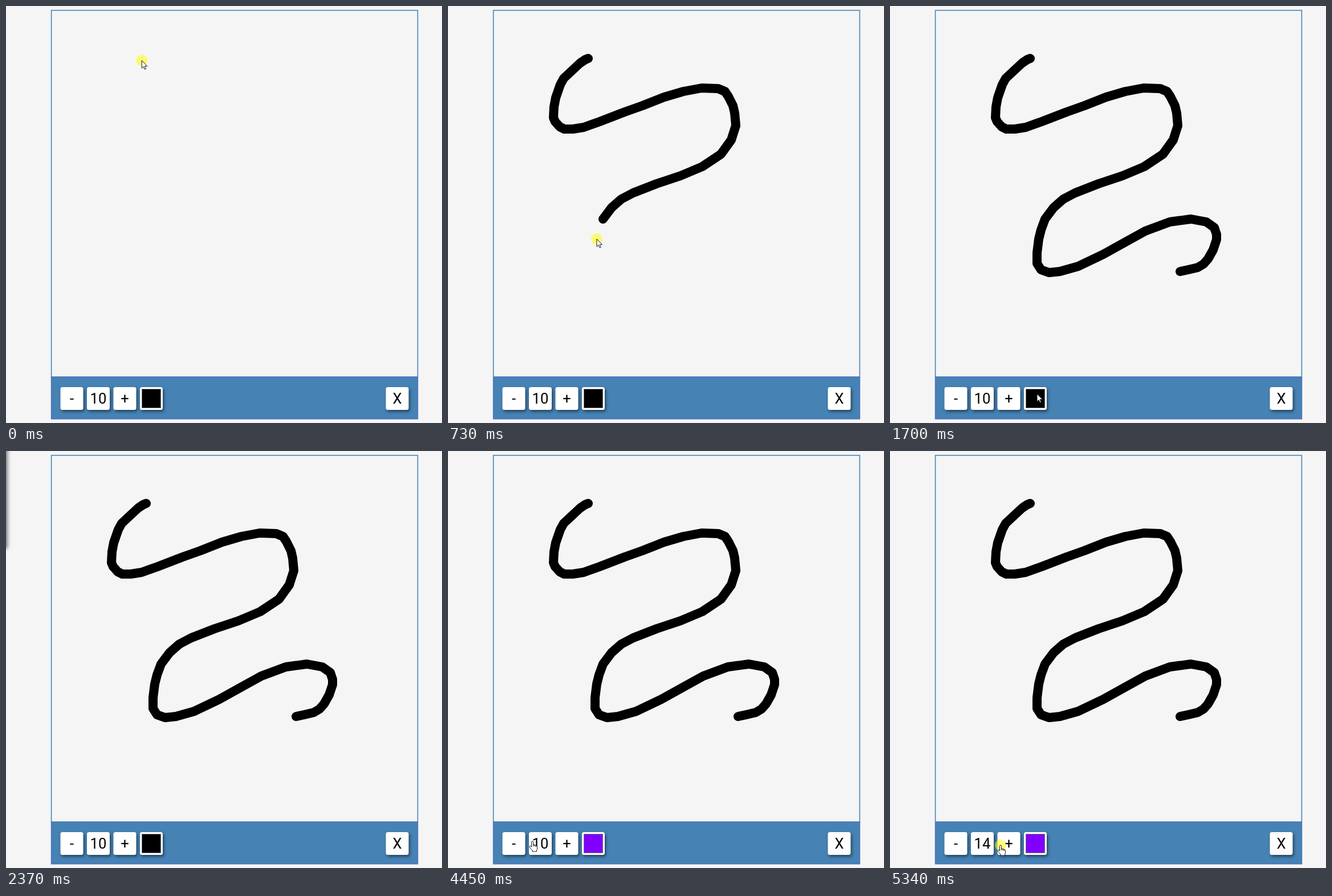
Write an HTML page that moves like this. It is 765x732 px and loops after 5.39 s.

```html
<!DOCTYPE html>
<html lang="en">
<head>
<meta charset="utf-8">
<title>Drawing pad</title>
<style>
  html, body { margin: 0; width: 100%; height: 100%; overflow: hidden; background: #f5f5f5; }
  svg { display: block; width: 100%; height: 100%; }
  text { font: 25.6px Roboto, sans-serif; text-anchor: middle; }
  .button { fill: #fff; filter: drop-shadow(2px 3px 2.5px rgba(0, 0, 0, .5)); }
  .frame { fill: none; stroke: #4682b4; stroke-width: 1.6; }
  .bar { fill: #4682b4; stroke: #4a72c4; stroke-width: 1.6; }
  #stroke { fill: none; stroke: #000; stroke-width: 16; stroke-linecap: round; stroke-linejoin: round; }
  #popup { fill: #fff; filter: drop-shadow(3px 4px 3px rgba(0, 0, 0, .5)); }
  #arrow, #hand { fill: #fff; stroke: #000; stroke-width: .9; stroke-linejoin: round; }
</style>
</head>
<body>
<svg viewBox="0 0 765 732">
  <rect class="frame" x="79.6" y="7.6" width="642.8" height="643.6"/>
  <rect class="bar" x="79.6" y="651.4" width="642.8" height="73.4"/>
  <g id="buttons"></g>
  <rect id="swatch" x="238.5" y="672.5" width="33" height="33" stroke="#777"/>
  <polyline id="stroke"/>
  <rect id="popup" x="-100" y="-50" width="100" height="217"/>
  <g id="cursor">
    <circle id="press" r="10" fill="#ff0" fill-opacity=".53"/>
    <path id="arrow" d="M0 0V13.5L3.1 10.6L5.2 15.5L7.2 14.6L5.2 9.8H9.5Z"/>
    <path id="hand" d="M-1.5 1.5a1.5 1.5 0 0 1 3 0V6l5 1.3q2 .6 2 2.5V13q0 1.5-1 3v2h-7.5v-2l-4.5-5q-1.5-2 .3-2.6 1.2-.3 2.7 1.6zM1.5 6v3M4 6.7v2.8M6.3 7.3v2.6"/>
  </g>
</svg>
<script>
const LOOP = 5390;
const $ = id => document.getElementById(id);

const points = [
  [246,92],[241,94],[232,100],[218,113],[203,127],[197,138],[189,161],[186,177],[185,196],[188,203],
  [196,212],[204,216],[219,216],[238,213],[266,203],[310,186],[341,175],[379,160],[413,150],[445,144],
  [474,145],[486,150],[492,159],[500,175],[503,188],[505,210],[497,235],[479,260],[446,282],[408,298],
  [366,312],[325,328],[304,339],[287,354],[272,374],[265,393],[261,409],[258,433],[258,452],[265,463],
  [279,468],[298,466],[330,457],[374,436],[410,416],[448,395],[491,379],[528,374],[555,379],[569,389],
  [573,401],[573,410],[567,428],[558,444],[550,453],[540,459],[523,463],[509,466]
];
const track = [...points, [502, 467]].map((point, i) => [i, ...point]);

// Time to number of the stroke point reached.
const progress = [[0, -.7], [60, 0], [460, 20], [580, 25], [980, 49], [1130, 57]];

// Time to pointer position once the stroke is done.
const travel = [
  [1130, 502, 467], [1550, 258, 681], [1920, 258, 681], [2370, -20, 90],
  [4050, -20, 120], [4450, 148, 685], [4570, 188, 694], [4620, 194, 692]
];

// Screen refreshes every 50 ms inside each run and rests between runs.
const runs = [[0, 0], [60, 460], [530, 1130], [1200, 1700], [1920, 2370], [3290, 3290],
  [4050, 4500], [4570, 5220], [5290, 5340]];

const plusClicks = [4640, 4820, 5000, 5150, 5340];
const CLICK = 90;

const clamp = (v, lo, hi) => Math.min(hi, Math.max(lo, v));
const linear = u => u;
const smooth = u => u * u * (3 - 2 * u);

function sample(keys, at, ease = linear) {
  const next = keys.findIndex(key => key[0] > at);
  if (next < 0) return keys[keys.length - 1].slice(1);
  if (next === 0) return keys[0].slice(1);
  const a = keys[next - 1], b = keys[next];
  const u = ease((at - a[0]) / (b[0] - a[0]));
  return a.slice(1).map((v, i) => v + (b[i + 1] - v) * u);
}

function snap(t) {
  const [start, end] = runs.filter(run => run[0] <= t).pop();
  return Math.min(end, start + Math.floor((t - start) / 50) * 50);
}

const show = (id, visible) => $(id).setAttribute("visibility", visible ? "visible" : "hidden");

$("buttons").innerHTML = [[95.5, "-"], [142, "10", "count"], [188.5, "+"], [235, ""], [666.5, "X"]]
  .map(([x, label, id = ""]) =>
    `<rect class="button" x="${x}" y="669" width="40" height="40" rx="3.5"/>
     <text ${id && `id="${id}"`} x="${x + 20}" y="698">${label}</text>`).join("");

function render(time) {
  const t = snap(time);
  const [reached] = sample(progress, t);
  const drawn = t < 60 ? [] : points.slice(0, Math.floor(reached) + 1);
  if (drawn.length === 1) drawn.push(drawn[0]);
  $("stroke").setAttribute("points", drawn.join(" "));

  const [x, y] = t <= 1130 ? sample(track, reached + 2) : sample(travel, t, smooth);
  $("cursor").setAttribute("transform", `translate(${x} ${y})`);
  const overButton = t >= 4450;
  show("arrow", !overButton);
  show("hand", overButton);

  const pressed = plusClicks.some(start => t >= start && t < start + CLICK);
  show("press", t <= 1130 || (t >= 1550 && t < 1650) || pressed);

  $("count").textContent = 10 + plusClicks.filter(start => t >= start + CLICK).length;
  $("swatch").setAttribute("fill", t < 3290 ? "#000" : "#8000ff");
  $("popup").setAttribute("opacity", clamp(Math.min((t - 1900) / 100, (4150 - t) / 100), 0, 1));
}

function tick() {
  render(performance.now() % LOOP);
  requestAnimationFrame(tick);
}
tick();
</script>
</body>
</html>
```
